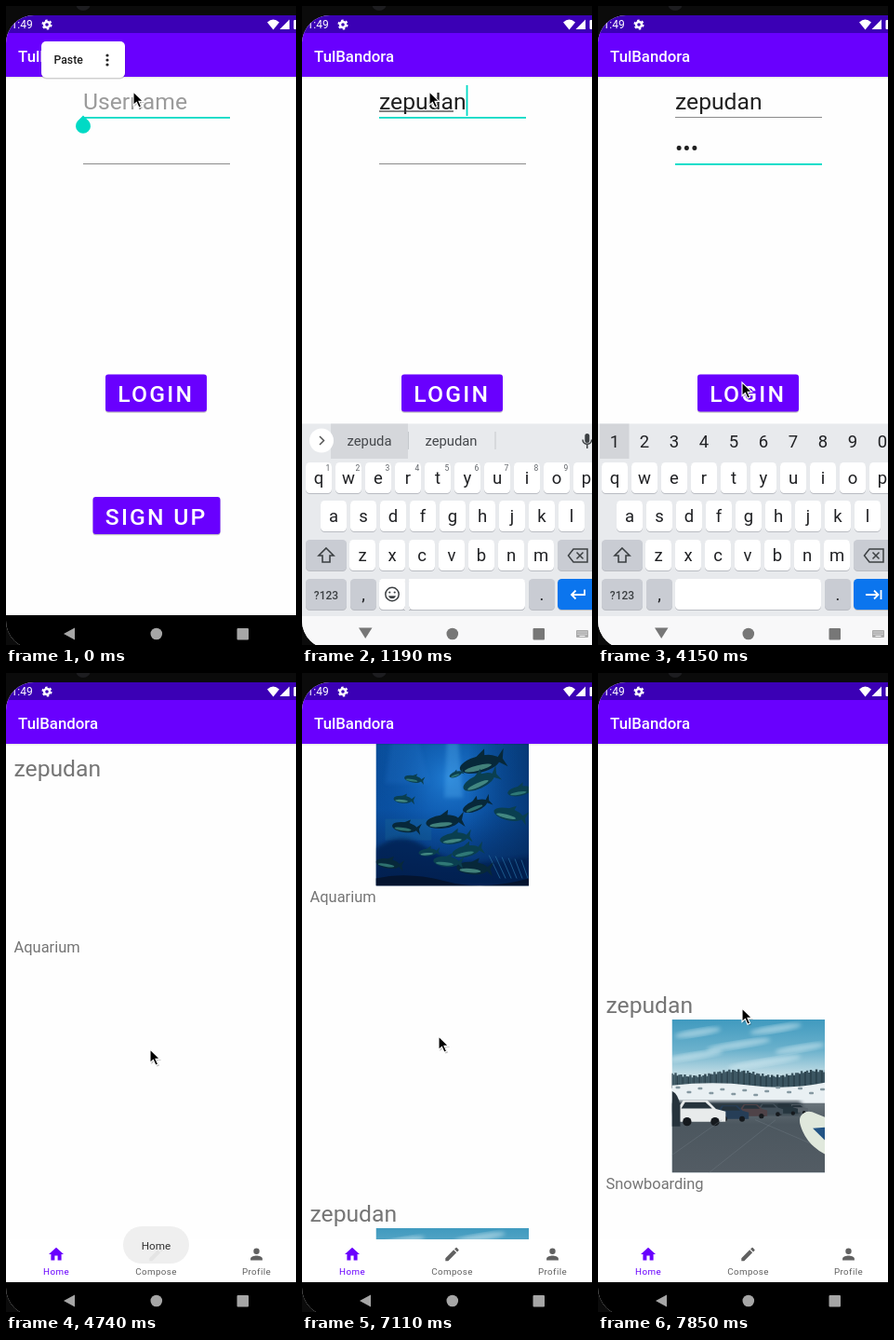
An HTML page for the animation above (7990 ms loop, 312 px wide and 686 px high).

```html
<!DOCTYPE html>
<html lang="en">
<head>
<meta charset="utf-8">
<title>Login and feed</title>
<style>
html, body { margin: 0; width: 100%; height: 100%; overflow: hidden; background: #0b0b0b; }
svg { display: block; width: 312px; height: 686px; font-family: Roboto, "Noto Sans", sans-serif; }
.mid { text-anchor: middle; }
.med { font-weight: 500; }
.big { font-size: 24.7px; }
.cap { font-size: 16.45px; fill: #757575; }
.key { font-size: 18.5px; fill: #202124; text-anchor: middle; }
.sup { font-size: 8.5px; fill: #5f6368; text-anchor: middle; }
.sug { font-size: 14.8px; fill: #44474b; text-anchor: middle; }
.tab { font-size: 9.8px; letter-spacing: .4px; text-anchor: middle; }
.btn { font-weight: 500; letter-spacing: 2.2px; fill: #fff; }
</style>
</head>
<body>
<svg id="stage" viewBox="0 0 312 686"></svg>
<script>
const TICK = 148, LOOP = 7990;
const APP = 'TulBandora', USER = 'zepudan', PASS = 'dul';
const PURPLE = '#6900fe', TEAL = '#00dac5';

const rect = (x, y, w, h, fill, rx = 0, more = '') =>
  `<rect x="${x}" y="${y}" width="${w}" height="${h}" fill="${fill}" rx="${rx}" ${more}/>`;
const circle = (x, y, r, fill, more = '') => `<circle cx="${x}" cy="${y}" r="${r}" fill="${fill}" ${more}/>`;
const oval = (x, y, rx, ry, fill, more = '') =>
  `<ellipse cx="${x}" cy="${y}" rx="${rx}" ry="${ry}" fill="${fill}" ${more}/>`;
const path = (d, fill, more = '') => `<path d="${d}" fill="${fill}" ${more}/>`;
const line = (d, stroke, w = 1.5, more = '') => path(d, 'none', `stroke="${stroke}" stroke-width="${w}" ${more}`);
const text = (x, y, s, cls, more = '') => `<text x="${x}" y="${y}" class="${cls}" ${more}>${s}</text>`;
const group = (id, body, more = '') => `<g id="${id}" ${more}>${body}</g>`;
const icon = (x, y, scale, d, fill) => path(d, fill, `transform="translate(${x} ${y}) scale(${scale}) translate(-12 -12)"`);

function statusBar() {
  return rect(0, 10, 312, 19.5, '#3b00b5') + rect(0, 29, 312, 47, PURPLE) +
    text(5.5, 24, '1:49', '', 'font-size="12" fill="#fff"') +
    circle(44, 20, 3, 'none', 'stroke="#fff" stroke-width="2.4"') +
    circle(44, 20, 4.7, 'none', 'stroke="#fff" stroke-width="1.7" stroke-dasharray="2.46"') +
    path('M281 17.5Q287.5 11.5 294 17.5L287.5 25.5Z', '#fff') +
    path('M305 14.5V25H294.5Z', '#fff') + rect(309.5, 15, 4, 10, '#fff', 1) +
    text(13, 59.5, APP, 'med', 'font-size="16.8" fill="#fff"');
}

function popup() {
  return group('popup', path('M83 117.5L89 123.5A8 8 0 1 1 77 123.5Z', TEAL) +
    rect(37.5, 39, 91, 39.5, '#000', 6, 'opacity=".16"') + rect(38, 38, 90, 39, '#fff', 5) +
    text(51.5, 62, 'Paste', 'med', 'font-size="12.2" fill="#1c1c1c"') +
    [53, 58, 63].map(y => circle(109, y, 1.6, '#222')).join(''));
}

function button(x, y, w, label) {
  return rect(x, y + 1.2, w, 40, '#000', 3, 'opacity=".22"') + rect(x, y, w, 40, PURPLE, 3) +
    text(x + 13.3, y + 29.5, label, 'btn big');
}

function login() {
  return rect(0, 76, 312, 580, '#fefefe') +
    text(83, 111, 'Username', 'big', 'id="hint" fill="#9b9b9b"') +
    text(83, 111, '', 'big', 'id="user" fill="#212121"') +
    text(83, 161, '', 'big', 'id="pass" fill="#212121"') +
    rect(83, 112.4, 0, 1.2, '#333', 0, 'id="spell"') +
    rect(83, 119, 158, 1, '#8b8b8b', 0, 'id="line1"') + rect(83, 169, 158, 1, '#8b8b8b', 0, 'id="line2"') +
    rect(0, 85, 1.8, 33, TEAL, 0, 'id="caret1"') + rect(0, 135, 1.8, 33, TEAL, 0, 'id="caret2"') +
    button(107, 395.5, 109, 'LOGIN') + rect(107, 395.5, 109, 40, '#fff', 3, 'id="ripple"') +
    button(93.5, 527, 137, 'SIGN UP');
}

function key(x, y, w, label, fill = '#fff', cls = 'key') {
  return rect(x, y + 1, w, 33, '#b9bcc2', 4.5) + rect(x, y, w, 33, fill, 4.5) +
    (label ? text(x + w / 2, y + 23, label, cls) : '');
}

function keyboard() {
  const grey = '#c9ccd3', ink = '#3c4043';
  const row = (s, x, y) => [...s].map((c, i) => key(x + 32 * i, y, 28, c)).join('');
  const digits = fn => [...'1234567890'].map((c, i) => fn(c, 18 + 32 * i)).join('');
  return rect(0, 448.5, 312, 207.5, '#e8eaed') +
    row('qwertyuiop', 4, 490) + row('asdfghjkl', 20, 531) + row('zxcvbnm', 51, 573) +
    key(4, 573, 44, '', grey) + line('M26 582L34 590H30V597H22V590H18Z', ink, 1.6) +
    key(275, 573, 44, '', grey) + line('M292 583H307V597H292L286.5 590Z', ink) +
    line('M295.5 586.5L302.5 593.5M302.5 586.5L295.5 593.5', ink) +
    key(4, 615, 44, '', grey) + text(26, 636.5, '?123', 'mid med', `font-size="12" fill="${ink}"`) +
    key(52, 615, 28, ',', grey) + key(83, 615, 157, '') + key(244, 615, 28, '.', grey) +
    key(275, 615, 44, '', '#0b75ee') +
    group('words',
      rect(31, 448.5, 83, 37.5, '#d5d7db') + rect(114, 457, 1, 19, '#c5c8cc') + rect(207.5, 457, 1, 19, '#c5c8cc') +
      circle(21, 466.5, 13, '#fff') + line('M19 462L23.5 466.5L19 471', '#555') +
      text(72.5, 472, '', 'sug', 'id="sug1"') + text(160.5, 472, '', 'sug', 'id="sug2"') +
      rect(304.3, 459, 5, 10, ink, 2.5) + line('M302 465.5A4.8 4.8 0 0 0 311.6 465.5M306.8 470.5V475', ink) +
      digits((c, x) => text(x + 10, 498.5, c, 'sup')) +
      rect(111, 614, 4, 36, '#e8eaed') + key(83, 615, 28, '') + key(115, 615, 125, '') +
      circle(97, 631.5, 7.2, 'none', `stroke="${ink}" stroke-width="1.5"`) +
      circle(94.3, 629.5, 1.1, ink) + circle(99.7, 629.5, 1.1, ink) + path('M93 633.2H101A4.2 4.2 0 0 1 93 633.2Z', ink) +
      line('M304 626.5V632H290M294.5 627.5L290 632L294.5 636.5', '#fff', 1.8)) +
    group('nums', rect(2, 448.5, 31.5, 37.5, '#d3d5d9') + digits((c, x) => text(x, 474, c, 'key')) +
      line('M288 632H301M297 627.5L301.5 632L297 636.5M304.5 627V637', '#fff', 1.8));
}

function navBar() {
  const common = c => circle(161.8, 674, 6.3, c) + rect(248.5, 668, 12.5, 12.5, c, 1);
  return group('navDark', rect(0, 654, 312, 32, '#000') + path('M62 674L74 667.5V680.5Z', '#a6a6a6') + common('#a6a6a6')) +
    group('navLight', rect(0, 655, 312, 31, '#f8f8f9') + path('M61 667.5H75.5L68.2 679Z', '#777') + common('#777') +
      rect(295, 670, 13, 8, '#aaa', 1) +
      [672, 674.3].map(y => line(`M296.5 ${y}H307`, '#f8f8f9', 1, 'stroke-dasharray="1 1"')).join('') +
      line('M298.5 676.5H304.5', '#f8f8f9', 1));
}

// x, y, length, tilt
const FISH = [[112, 34, 44, -14], [86, 45, 14, -20], [111, 53, 36, -24], [107, 79, 28, -22], [143, 88, 32, 14],
  [155, 63, 26, -10], [72, 96, 36, -6], [40, 50, 19, 10], [29, 72, 20, 5], [31, 102, 27, 8], [84, 114, 30, -8],
  [97, 128, 30, -12], [104, 146, 34, 4], [76, 139, 28, 5], [56, 129, 20, -4], [13, 141, 26, 9], [129, 9, 16, 4]];

function aquarium() {
  const fish = FISH.map(([x, y, l, a], i) => {
    const h = l * .2, shade = i % 3 ? '#0a3f50' : '#07283a';
    return `<g transform="translate(${x} ${y}) rotate(${a})">` + oval(0, 0, l / 2, h, shade) +
      path(`M${l * .4} 0L${l * .66} ${-h * 1.2}L${l * .58} 0L${l * .66} ${h * 1.1}Z`, shade) +
      path(`M${-l * .1} ${-h * .8}L${l * .2} ${-h * 1.7}L${l * .15} ${-h * .6}Z`, shade) +
      oval(-l * .06, h * .4, l * .34, h * .32, i % 2 ? '#3f9187' : '#5aa596', 'opacity=".7"') + '</g>';
  }).join('');
  return rect(0, 0, 165, 165, 'url(#sea)') + rect(0, 0, 165, 165, 'url(#glow)') + rect(0, 0, 165, 165, 'url(#dim)') +
    path('M77 0H88L94 70H74Z', '#50a9ec', 'opacity=".4" filter="url(#soft)"') +
    path('M18 0H44L58 55H10Z', '#2a7fd6', 'opacity=".2" filter="url(#soft)"') +
    rect(10, 93, 50, 23, '#1d6c95', 0, 'opacity=".3"') +
    path('M0 125Q25 105 52 122T100 140T165 134V165H0Z', '#061f48', 'opacity=".7" filter="url(#soft)"') +
    [0, 1, 2, 3, 4, 5].map(i => line(`M${122 + i * 7} ${132 + i}L${134 + i * 6} 157`, '#24689b', .8)).join('') +
    path('M0 157Q35 149 75 160T165 157V165H0Z', '#04142f') + fish;
}

function car(x, y, w, fill) {
  const h = w * .44;
  return path(`M${x} ${y}V${y - h * .6}L${x + w * .12} ${y - h}H${x + w * .62}L${x + w * .8} ${y - h * .6}L${x + w} ${y - h * .48}V${y}Z`, fill) +
    path(`M${x + w * .08} ${y - h * .62}L${x + w * .16} ${y - h * .92}H${x + w * .58}L${x + w * .72} ${y - h * .62}Z`, '#26333c') +
    circle(x + w * .2, y, w * .09, '#15191d') + circle(x + w * .78, y, w * .09, '#15191d');
}

function snow() {
  const clouds = [[28, 14, 50], [112, 10, 56], [72, 27, 70], [138, 31, 54], [25, 39, 60], [100, 46, 80]];
  const trees = Array.from({length: 84}, (_, i) => {
    const top = 58 + 3 * Math.sin(i * .14) + 1.5 * Math.sin(i * 2.4);
    return line(`M${i * 2} ${top}V74`, i % 3 ? '#3b5561' : '#2c434e', 2.4);
  }).join('');
  return rect(0, 0, 165, 165, 'url(#sky)') +
    clouds.map(([x, y, w]) => oval(x, y, w / 2, 4, '#dceff4', `opacity=".5" filter="url(#soft)" transform="rotate(-9 ${x} ${y})"`)).join('') +
    trees + path('M0 71Q45 66 85 71T165 68V94H0Z', '#e9f0f3') +
    Array.from({length: 14}, (_, i) => rect(4 + i * 12, 72 + i * 5 % 9, 5, 2.5, '#8598a1', 1)).join('') +
    rect(0, 90, 165, 75, 'url(#road)') +
    rect(0, 88, 140, 14, '#2b3942', 4, 'filter="url(#soft)"') +
    car(127, 100, 20, '#59636b') + car(112, 101, 24, '#26363f') + car(94, 102, 26, '#414f59') +
    car(74, 104, 29, '#4f4348') + car(50, 107, 33, '#263e57') + car(6, 110, 52, '#e8ebeb') +
    path('M0 77Q7 80 9 93V115H0Z', '#26333c') +
    line('M0 146L54 108M40 165L112 108M165 140L90 108', '#75818a', .7, 'opacity=".5"') +
    path('M139 104Q145 96 155 101L165 105V145Q148 136 141 120Q136 109 139 104Z', '#e0e8dc') +
    path('M152 117L165 116V130Z', '#235485');
}

function post(y, title, photo, id) {
  return `<g transform="translate(0 ${y})">` + text(8.5, 111, USER, 'big', 'fill="#757575"') +
    `<svg id="${id}" x="79.5" y="118" width="164.5" height="164.5" viewBox="0 0 165 165">${photo}</svg>` +
    text(8.5, 300, title, 'cap') + '</g>';
}

function home() {
  const tab = (x, label, d, fill) => icon(x, 624, .8, d, fill) + text(x, 645.5, label, 'tab', `fill="${fill}"`);
  return rect(0, 76, 312, 578, '#fefefe') +
    `<g clip-path="url(#list)">${group('feed', post(0, 'Aquarium', aquarium(), 'pic1') + post(532, 'Snowboarding', snow(), 'pic2'))}</g>` +
    rect(0, 608, 312, 46, '#fff') +
    tab(54, 'Home', 'M10 20v-6h4v6h5v-8h3L12 3 2 12h3v8z', PURPLE) +
    tab(161.5, 'Compose', 'M3 17.25V21h3.75L17.8 9.94l-3.75-3.75zM20.7 7a1 1 0 0 0 0-1.4l-2.3-2.3a1 1 0 0 0-1.4 0l-1.8 1.8 3.75 3.75z', '#616161') +
    tab(269.5, 'Profile', 'M12 12a4 4 0 1 0 0-8 4 4 0 0 0 0 8zm0 2c-2.7 0-8 1.3-8 4v2h16v-2c0-2.7-5.3-4-8-4z', '#616161') +
    group('toast', rect(126, 594, 71, 40, '#eeeeee', 20) + text(161.5, 618.7, 'Home', 'mid', 'font-size="11.7" fill="#222"'));
}

const fade = (id, stops, kind = 'linearGradient', more = 'x2="0" y2="1"') =>
  `<${kind} id="${id}" ${more}>` + stops.map(([o, c, a = 1]) =>
    `<stop offset="${o}" stop-color="${c}" stop-opacity="${a}"/>`).join('') + `</${kind}>`;

const ARROW = 'M0 0V14.5L3.4 11.4L6 17.2L8.6 16L6 10.4H10.6Z';

stage.innerHTML = '<defs>' +
  `<clipPath id="screen">${rect(0, 10, 400, 680, '#000', 30)}</clipPath><clipPath id="list">${rect(0, 76, 312, 532, '#000')}</clipPath>` +
  '<filter id="soft"><feGaussianBlur stdDeviation="2.2"/></filter>' +
  fade('sea', [[0, '#0a55a6'], [.5, '#0a56ac'], [1, '#062a60']]) +
  fade('glow', [[0, '#2c92ea', .65], [1, '#0a4a9c', 0]], 'radialGradient', 'cx=".48" cy=".3" r=".5"') +
  fade('dim', [[0, '#042450', .15], [.35, '#042450', 0], [.6, '#042450', 0], [1, '#042450', .55]], 'linearGradient', '') +
  fade('sky', [[0, '#409abf'], [.2, '#6bb1cc'], [.36, '#c3dde5']]) +
  fade('road', [[0, '#69747b'], [.3, '#4c575f'], [1, '#535c64']]) +
  fade('shade', [[0, '#000', .12], [1, '#000', 0]]) + '</defs>' +
  rect(0, 0, 312, 686, '#0b0b0b') + circle(83, -3, 8, '#1d1d20') +
  `<g clip-path="url(#screen)">${rect(0, 10, 312, 676, '#fefefe')}${login()}` +
  group('kb', keyboard()) + group('home', home()) + rect(0, 76, 312, 2, 'url(#shade)') +
  statusBar() + popup() + navBar() + '</g>' +
  group('mouse', path(ARROW, '#000', 'opacity=".25" transform="translate(1.4 1.4)"') +
    path(ARROW, '#000', 'stroke="#fff" stroke-width="1.1"'));

const el = {};
document.querySelectorAll('[id]').forEach(n => el[n.id] = n);
const show = (id, on) => el[id].setAttribute('opacity', +on);
const set = (id, attrs) => { for (const k in attrs) el[id].setAttribute(k, attrs[k]); };
const move = (id, x, y) => set(id, {transform: `translate(${x} ${y})`});

// Linear track through [tick, value] points
function at(n, track, k = 1) {
  let a = track[0];
  for (const b of track) {
    if (n < b[0]) return a === b || n <= a[0] ? a[k] : a[k] + (b[k] - a[k]) * (n - a[0]) / (b[0] - a[0]);
    a = b;
  }
  return a[k];
}

const MOUSE = [[0, 137, 92], [19, 137, 92], [20, 152, 135], [22, 203, 270], [23, 185, 350], [24, 155, 404],
  [33, 155, 404], [36, 133, 462], [44, 133, 462], [48, 147, 390], [51, 158, 182], [53, 155, 360]];
const SCROLL = [[45, 0], [48, 54], [51, 272], [52, 277], [53, 278]];
const TOAST = [[30, 0], [31, .5], [32, .93], [43, .93], [44, .75], [46, 0]];
const TYPED = [1, 2, 4, 5, 6, 7];

function password(n) {
  if (n < 15) return '';
  const count = n < 17 ? 1 : n < 18 ? 2 : 3;
  return n < 27 ? '•'.repeat(count - 1) + PASS[count - 1] : '•••';
}

function draw(n) {
  const typed = n < 3 ? '' : USER.slice(0, TYPED[Math.min(n - 3, 5)]);
  const second = n >= 10, kbOn = n >= 3 && n < 30;
  const known = typed.slice(0, -1);

  el.user.textContent = known;
  const knownWidth = known ? el.user.getComputedTextLength() : 0;
  el.user.textContent = typed;
  el.pass.textContent = password(n);
  el.sug1.textContent = known;
  el.sug2.textContent = typed;
  set('spell', {width: second ? 0 : knownWidth});
  set('caret1', {x: 83 + (typed ? el.user.getComputedTextLength() : 0)});
  set('caret2', {x: 82.5 + (n >= 15 ? el.pass.getComputedTextLength() : 0)});
  show('caret1', n >= 3 && !second);
  show('caret2', second && n !== 14 && (n < 20 || n === 23 || n === 24));
  show('hint', !typed);
  show('popup', n < 3);
  set('line1', {height: second ? 1 : 1.8, fill: second ? '#8b8b8b' : TEAL});
  set('line2', {height: second ? 1.8 : 1, fill: second ? TEAL : '#8b8b8b'});
  show('ripple', n === 26 ? .14 : n === 27 ? .22 : 0);

  show('kb', kbOn);
  move('kb', 0, n === 3 ? 120 : 0);
  show('words', !second);
  show('nums', second);
  show('navLight', kbOn);
  show('navDark', !kbOn);

  show('home', n < 30 ? 0 : n === 30 ? .5 : 1);
  show('toast', at(n, TOAST));
  show('pic1', n >= 34);
  move('feed', 0, -at(n, SCROLL));
  move('mouse', at(n, MOUSE), at(n, MOUSE, 2));
}

const start = performance.now();
let last = -1;
function frame() {
  const n = Math.floor((performance.now() - start) % LOOP / TICK);
  if (n !== last) draw(last = n);
  requestAnimationFrame(frame);
}
frame();
</script>
</body>
</html>
```
